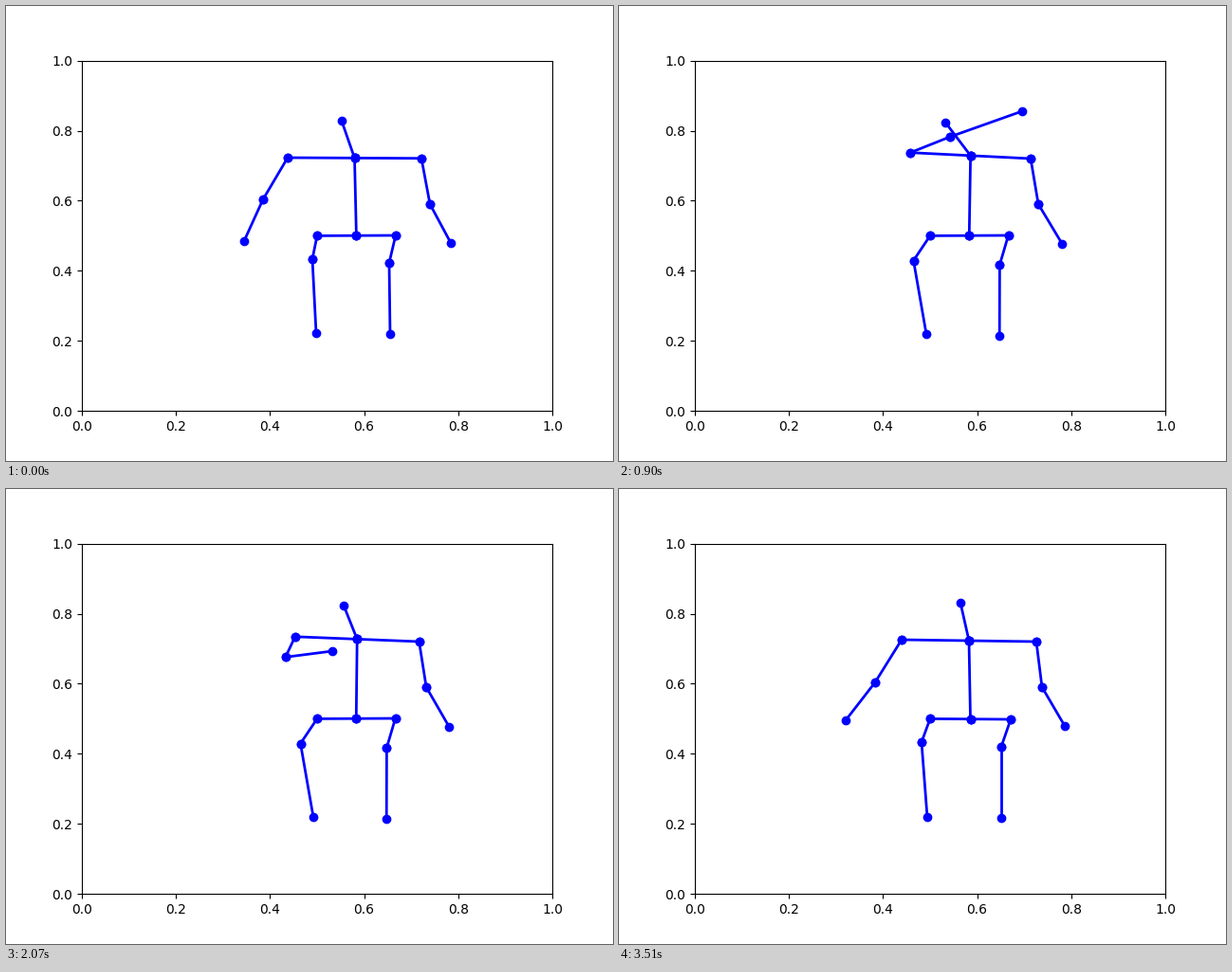
Write a matplotlib script that moves like this. It is 640 px wide and 480 px high and loops after 3.54 s.

```python
import numpy as np
import matplotlib.pyplot as plt
from matplotlib.animation import FuncAnimation

FRAMES, INTERVAL = 118, 30
n = np.arange(FRAMES)

# Joint: start, raised and final position, in stage pixels from the top left.
LIFTED = {
    "l_shoulder": [(297, 160), (308.5, 154), (298, 159)],
    "r_shoulder": [(438, 160.7), (433.5, 161), (440, 161)],
    "r_elbow": [(447, 209), (441.5, 209), (446, 209)],
}
BRACED = {
    "head": [(354, 121), (356, 122.7), (360, 120)],
    "r_wrist": [(469, 250), (467.3, 251), (470, 250)],
    "r_hip": [(410.8, 242), (410.5, 242), (413, 243)],
    "l_knee": [(323, 267), (310.5, 268.5), (319, 267)],
    "l_ankle": [(327, 345), (324, 346), (325, 346)],
    "r_knee": [(404, 271), (401.4, 273), (403, 272)],
    "r_ankle": [(405, 346), (401.2, 347.5), (403, 346.5)],
}

# Key points of the arm that swings up and back down.
SWING_TIMES = [0, 11, 18, 30, 44, 60, 78, 92]
SWING = {
    "l_elbow": [(271, 204), (275, 191), (297, 168), (349, 138),
                (352, 135), (331, 153), (267, 198), (270, 204)],
    "l_wrist": [(251, 248), (275, 207), (318, 150), (425, 111),
                (430, 98), (413, 130), (268, 213), (239, 244)],
}

CHAINS = [
    ["head", "neck", "pelvis"],
    ["l_wrist", "l_elbow", "l_shoulder", "neck", "r_shoulder", "r_elbow", "r_wrist"],
    ["l_ankle", "l_knee", "l_hip", "pelvis", "r_hip", "r_knee", "r_ankle"],
]
BONES = [pair for chain in CHAINS for pair in zip(chain, chain[1:])]


def ease(start, end):
    u = np.clip((n - start) / (end - start), 0, 1)[:, None]
    return u * u * (3 - 2 * u)


def mix(a, b, weight):
    return np.array(a) * (1 - weight) + np.array(b) * weight


def smooth(times, values):
    """Monotone cubic through the key values, sampled once per frame."""
    t, v = np.array(times, float), np.array(values, float)
    step = np.diff(t)
    slope = np.diff(v) / step
    a, b = slope[:-1], slope[1:]
    tangent = np.zeros(len(v))
    same = a * b > 0
    tangent[1:-1][same] = 2 * a[same] * b[same] / (a + b)[same]
    k = np.clip(np.searchsorted(t, n, side="right") - 1, 0, len(step) - 1)
    h = step[k]
    u = np.clip((n - t[k]) / h, 0, 1)
    w = u * u * (3 - 2 * u)
    return (v[k] * (1 - w) + v[k + 1] * w
            + h * u * (1 - u) * (tangent[k] * (1 - u) - tangent[k + 1] * u))


def build_tracks():
    lift = ease(0, 38) * (1 - ease(58, 86))
    brace = ease(0, 11) * (1 - ease(75, 97))
    settle = ease(0, 100)
    tracks = {}
    for joints, weight in ((LIFTED, lift), (BRACED, brace)):
        for name, (start, raised, final) in joints.items():
            tracks[name] = mix(mix(start, final, settle), raised, weight)
    for name, points in SWING.items():
        tracks[name] = np.column_stack([smooth(SWING_TIMES, axis) for axis in zip(*points)])
    # The head leans aside while the arm goes up.
    tracks["head"][:, 0] -= 12 * np.exp(-((n - 29) / 14) ** 2)

    tracks = {name: (p - (80, 427.2)) / (496, -369.6) for name, p in tracks.items()}
    tracks["l_hip"] = np.full((FRAMES, 2), 0.5)
    tracks["neck"] = (tracks["l_shoulder"] + tracks["r_shoulder"]) / 2
    tracks["pelvis"] = (tracks["l_hip"] + tracks["r_hip"]) / 2
    return tracks


tracks = build_tracks()

fig, ax = plt.subplots(figsize=(6.4, 4.8), dpi=100)
ax.set_xlim(0, 1)
ax.set_ylim(0, 1)
lines = [ax.plot([], [], "bo-", lw=2)[0] for _ in BONES]


def update(frame):
    for line, (a, b) in zip(lines, BONES):
        line.set_data(*zip(tracks[a][frame], tracks[b][frame]))
    return lines


anim = FuncAnimation(fig, update, frames=FRAMES, interval=INTERVAL,
                     repeat=True, repeat_delay=0)
plt.show()
```
